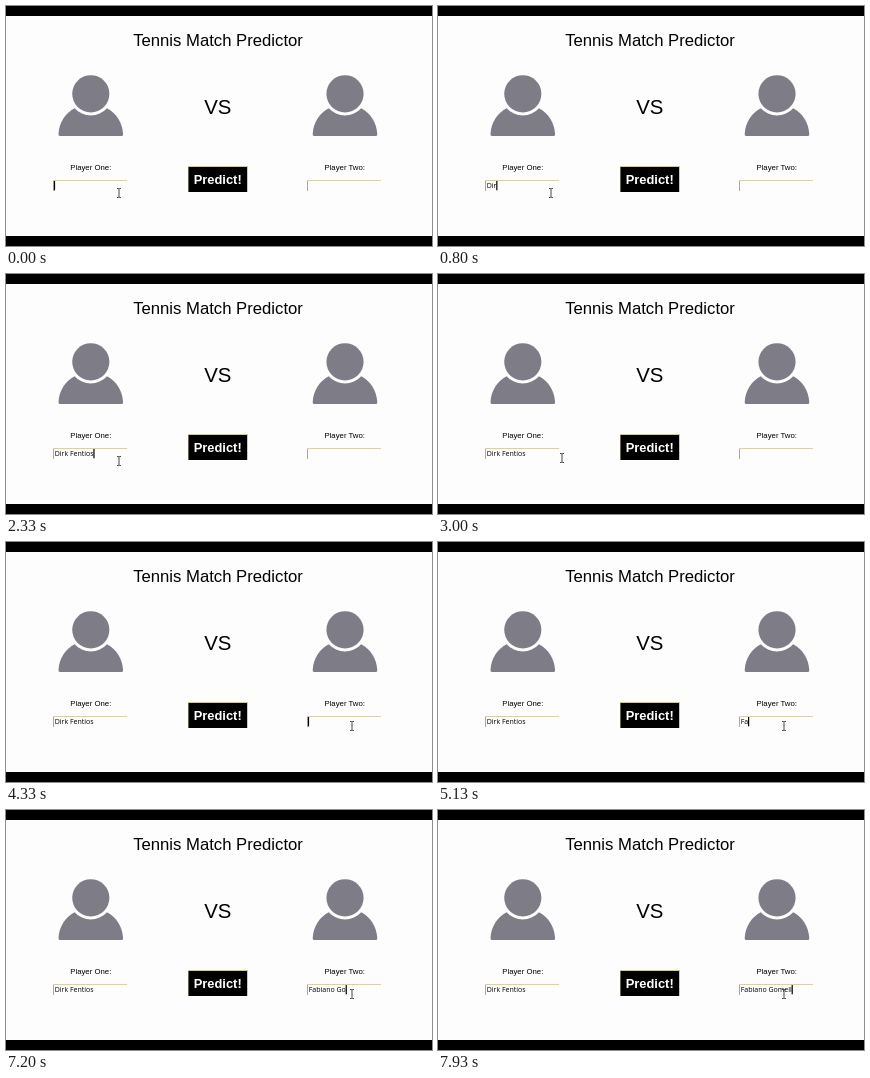
Write an HTML page that moves like this. It is 426 px wide and 240 px high and loops after 8000 ms.

```html
<!DOCTYPE html>
<html lang="en">
<head>
<meta charset="utf-8">
<title>Tennis Match Predictor</title>
<style>
  html, body { margin: 0; width: 100%; height: 100%; overflow: hidden; background: #000; }
  svg { display: block; width: 100%; height: 100%; }
  text { font-family: "Liberation Sans", Arial, sans-serif; text-anchor: middle; }
  .title { font-size: 16.7px; }
  .versus { font-size: 20.4px; }
  .label { font-size: 7.8px; }
  .button { font-size: 12.9px; font-weight: bold; fill: #fff; }
  .entry { font: 500 7px "Open Sans", "Noto Sans", sans-serif; text-anchor: start; white-space: pre; }
  .avatar { fill: #7e7c87; }
  .field { fill: none; stroke-width: 1; }
  #pointer { fill: none; stroke: #333; stroke-width: .9; }
</style>
</head>
<body>
<svg viewBox="0 0 426 240">
  <defs>
    <g id="person" class="avatar">
      <path d="M-31 42.2Q-32.5 42.2-32.3 40.5C-31.8 29-25.5 19-16.2 14.4A21.6 21.6 0 0 0 16.2 14.4C25.5 19 31.8 29 32.3 40.5Q32.5 42.2 31 42.2Z"/>
      <circle r="18.6"/>
    </g>
    <g id="box" class="field">
      <path d="M.5 11V.5" stroke="#aaa9a5"/>
      <path d="M1 .5H74" stroke="#d6d1ac"/>
    </g>
  </defs>
  <rect y="10" width="426" height="220" fill="#fdfdfd"/>
  <text class="title" x="212" y="40">Tennis Match Predictor</text>
  <text class="versus" x="211.8" y="108">VS</text>
  <use href="#person" x="84.8" y="87.8"/>
  <use href="#person" x="339" y="87.8"/>
  <text class="label" x="84.8" y="164">Player One:</text>
  <text class="label" x="338.7" y="164">Player Two:</text>
  <rect x="182" y="160" width="60" height="26" fill="#cfcc9a"/>
  <rect x="182.5" y="161" width="58.5" height="25"/>
  <text class="button" x="211.7" y="178">Predict!</text>
  <use href="#box" x="47" y="174"/>
  <use href="#box" x="301" y="174"/>
  <text class="entry" id="one" x="48.7" y="182.3"></text>
  <text class="entry" id="two" x="302.7" y="182.3"></text>
  <rect id="caret" y="175" width="1.2" height="9.3"/>
  <path id="pointer" d="M-2-4.5H-.6L0-4L.6-4.5H2M0-4V4M-2 4.5H-.6L0 4L.6 4.5H2"/>
</svg>
<script>
  const LOOP = 8000, KEY_GAP = 170, BLINK = 530;
  const get = id => document.getElementById(id);
  const caret = get('caret'), pointer = get('pointer');

  // Each burst is [start time, number of keys].
  const fields = [
    { node: get('one'), x: 48.7, focus: 0, name: 'Dirk Fentios', bursts: [[350, 12]] },
    { node: get('two'), x: 302.7, focus: 3950, name: 'Fabiano Gomelli', bursts: [[4850, 6], [6640, 9]] }
  ];
  for (const field of fields) {
    field.keys = field.bursts.flatMap(([start, count]) =>
      Array.from({ length: count }, (_, i) => start + i * KEY_GAP));
  }

  // Pointer moves: [start, end, from x, from y, to x, to y].
  const moves = [[2600, 2900, 113, 187, 124, 184], [3200, 3850, 124, 184, 346, 184]];

  function pointerAt(t) {
    const [start, end, x0, y0, x1, y1] = t < moves[1][0] ? moves[0] : moves[1];
    const p = Math.min(1, Math.max(0, (t - start) / (end - start)));
    const ease = p * p * (3 - 2 * p);
    return [x0 + (x1 - x0) * ease, y0 + (y1 - y0) * ease];
  }

  function render(t) {
    for (const field of fields) {
      const typed = field.keys.filter(time => time <= t).length;
      field.node.textContent = field.name.slice(0, typed);
      if (t < field.focus) continue;
      const last = typed ? field.keys[typed - 1] : field.focus;
      const width = typed ? field.node.getComputedTextLength() : 0;
      caret.setAttribute('x', field.x + width - (typed ? 0.2 : 0.8));
      caret.style.opacity = Math.floor((t - last) / BLINK) % 2 ? 0 : 1;
    }
    pointer.setAttribute('transform', `translate(${pointerAt(t)})`);
  }

  const origin = performance.now();
  function tick() {
    render((performance.now() - origin) % LOOP);
    requestAnimationFrame(tick);
  }
  render(0);
  requestAnimationFrame(tick);
</script>
</body>
</html>
```
